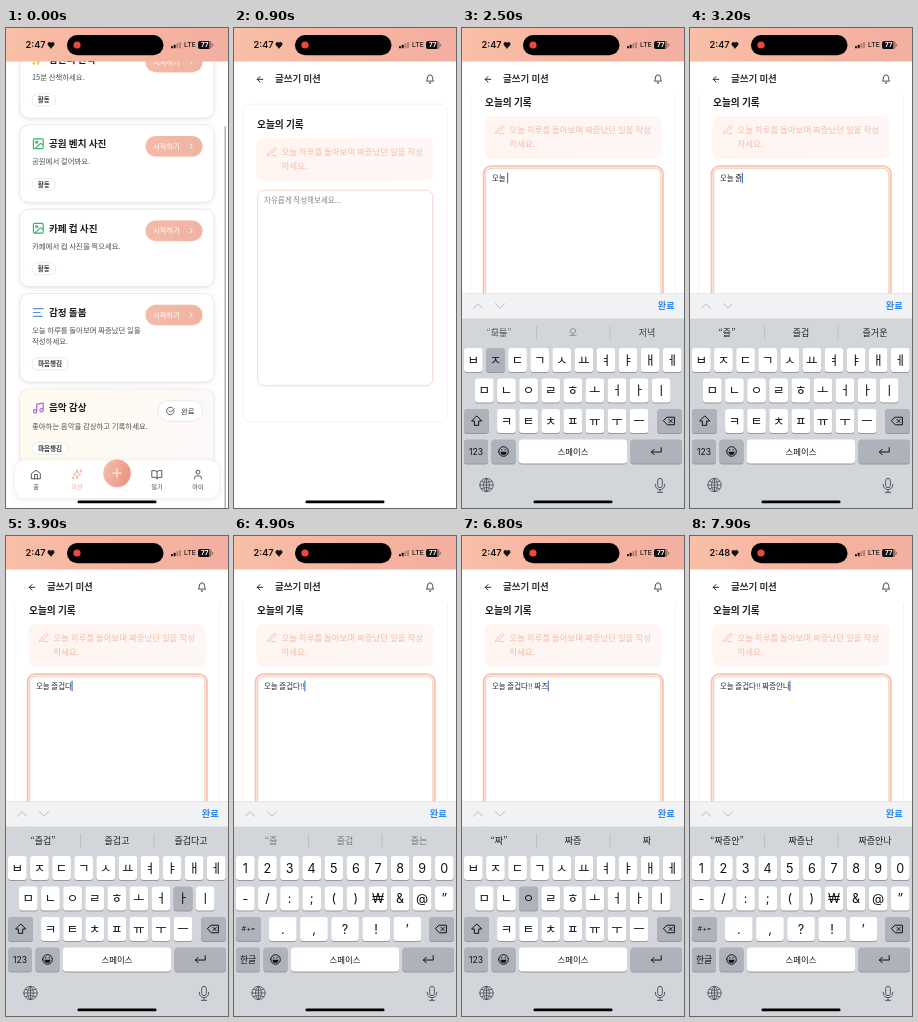
An HTML page with a canvas that plays this animation: 222x480 px, repeating every 8000 ms.

```html
<!DOCTYPE html>
<html lang="ko">
<head>
<meta charset="utf-8">
<title>Writing mission</title>
<style>
html, body { margin: 0; width: 100%; height: 100%; overflow: hidden; background: #fff; }
canvas { display: block; width: 222px; height: 480px; }
</style>
</head>
<body>
<canvas id="stage"></canvas>
<script>
const W = 222, H = 480, LOOP = 8000;
const canvas = document.getElementById('stage');
const ctx = canvas.getContext('2d');
const ratio = window.devicePixelRatio || 1;
canvas.width = W * ratio;
canvas.height = H * ratio;

const KR = '"Noto Sans CJK KR", "Noto Sans CJK", sans-serif';
const LATIN = 'Inter, sans-serif';
const PEACH = '#f5bda9', INK = '#25262b', SPECIAL = '#aeb2ba';

// Outline icons on a 24 unit grid
const ICONS = {
  home: 'M3 10l9-7 9 7v11H3zM9 21v-9h6v9',
  image: 'M5 3h14a2 2 0 0 1 2 2v14a2 2 0 0 1-2 2H5a2 2 0 0 1-2-2V5a2 2 0 0 1 2-2zM7 9a2 2 0 1 0 4 0a2 2 0 1 0-4 0M21 15l-3-3a2 2 0 0 0-3 0L6 21',
  lines: 'M3 5h18M3 12h12M3 19h16',
  music: 'M9 18V5l12-2v13M3 18a3 3 0 1 0 6 0a3 3 0 1 0-6 0M15 16a3 3 0 1 0 6 0a3 3 0 1 0-6 0',
  check: 'M21.5 10a10 10 0 1 1-5-7M8 11l4 4 10-10',
  book: 'M12 7v14M2 4h6a4 4 0 0 1 4 3a4 4 0 0 1 4-3h6v14h-7a3 3 0 0 0-3 3a3 3 0 0 0-3-3H2z',
  user: 'M19 21v-2a4 4 0 0 0-4-4H9a4 4 0 0 0-4 4v2M8 7a4 4 0 1 0 8 0a4 4 0 1 0-8 0',
  spark: 'M12 3l-2 6-6 3 6 2 2 7 2-7 6-2-6-3zM20 2v5M17.5 4.5h5M4 17v4M2 19h4',
  pen: 'M12 20h9M16.5 3.5a2 2 0 0 1 4 3L7 19l-4 1 1-4z',
  bell: 'M6 8a6 6 0 0 1 12 0c0 7 3 9 3 9H3s3-2 3-9M10 21a2 2 0 0 0 4 0',
  back: 'M12 19l-7-7 7-7M19 12H5',
  right: 'M9 5l7 7-7 7',
  up: 'M2 17l10-10 10 10',
  down: 'M2 7l10 10 10-10',
  shift: 'M12 3L3 12h5v8h8v-8h5z',
  erase: 'M9 5h13v14H9L2 12zM12 9l6 6M18 9l-6 6',
  enter: 'M21 5v8H3M8 8l-5 5 5 5',
  globe: 'M2 12a10 10 0 1 0 20 0a10 10 0 1 0-20 0M2 12h20M12 2v20M12 2c-6 5-6 15 0 20c6-5 6-15 0-20M4 6.5q8 4 16 0M4 17.5q8-4 16 0',
  mic: 'M12 2a3.5 3.5 0 0 1 3.5 3.5v7a3.5 3.5 0 0 1-7 0v-7a3.5 3.5 0 0 1 3.5-3.5M5 11v1a7 7 0 0 0 14 0v-1M12 19v4M8 23h8',
  face: 'M2 12a10 10 0 1 0 20 0a10 10 0 1 0-20 0M8.5 7.5v1.500M15.500 7.5v1.500',
  mouth: 'M6 13a6 6 0 0 0 12 0z',
  heart: 'M12 21C5 15 2 12 2 8a5.5 5.5 0 0 1 10-3a5.5 5.5 0 0 1 10 3c0 4-3 7-10 13z'
};
for (const name in ICONS) ICONS[name] = new Path2D(ICONS[name]);

function icon(name, cx, cy, size, color, weight = 0.9, fill) {
  const k = size / 24;
  ctx.save();
  ctx.translate(cx - size / 2, cy - size / 2);
  ctx.scale(k, k);
  ctx.lineWidth = weight / k;
  ctx.lineCap = ctx.lineJoin = 'round';
  ctx.strokeStyle = color;
  if (fill) {
    ctx.fillStyle = fill;
    ctx.fill(ICONS[name]);
  }
  ctx.stroke(ICONS[name]);
  ctx.restore();
}

function rect(x, y, w, h, color) {
  ctx.fillStyle = color;
  ctx.fillRect(x, y, w, h);
}

function box(x, y, w, h, r, fill, line, weight = 0.6) {
  ctx.beginPath();
  ctx.roundRect(x, y, w, h, r);
  if (fill) {
    ctx.fillStyle = fill;
    ctx.fill();
  }
  if (line) {
    ctx.strokeStyle = line;
    ctx.lineWidth = weight;
    ctx.stroke();
  }
}

function withShadow(color, blur, dy, draw) {
  ctx.save();
  ctx.shadowColor = color;
  ctx.shadowBlur = blur * ratio;
  ctx.shadowOffsetY = dy * ratio;
  draw();
  ctx.restore();
}

// y is the middle of the line
function text(s, x, y, size, color = INK, weight = 400, align = 'left', family = KR) {
  ctx.font = `${weight} ${size}px ${family}`;
  ctx.textAlign = align;
  ctx.fillStyle = color;
  ctx.fillText(s, x, y + size * 0.36);
  return ctx.measureText(s).width;
}

function blend(x0, y0, x1, y1, ...colors) {
  const g = ctx.createLinearGradient(x0, y0, x1, y1);
  colors.forEach((c, i) => g.addColorStop(i / (colors.length - 1), c));
  return g;
}

const clamp = v => Math.max(0, Math.min(1, v));
const easeOut = v => 1 - (1 - clamp(v)) ** 3;

function statusBar(t) {
  rect(0, 0, W, 33.5, blend(0, 0, W, 33, '#f9bfa7', '#f6b4a0', '#f3afa1'));
  text(t < 7200 ? '2:47' : '2:48', 19.5, 17, 9.2, '#111', 600, 'left', LATIN);
  icon('heart', 45, 17.2, 7.8, '#111', 0.4, '#111');
  box(61, 7, 96.5, 20.3, 10.1, '#000');
  ctx.beginPath();
  ctx.arc(71, 17, 3.6, 0, 7);
  ctx.fillStyle = '#f0463c';
  ctx.fill();
  for (let i = 0; i < 4; i++) {
    const h = 2.2 + i * 1.4;
    box(165 + i * 2.7, 20.3 - h, 1.9, h, 0.5, i < 2 ? '#111' : 'rgba(60,30,25,.35)');
  }
  text('LTE', 178, 17, 6.8, '#111', 500, 'left', LATIN);
  box(192, 13, 13.6, 8, 2.3, 'rgba(50,30,25,.45)');
  box(192, 13, 11, 8, [2.3, 0, 0, 2.3], '#111');
  box(206.2, 15.7, 1, 2.8, 0.5, 'rgba(50,30,25,.45)');
  text('77', 198.7, 17, 6.4, '#fff', 700, 'center', LATIN);
}

function homeBar() {
  box(71.5, 472.6, 79, 2.7, 1.3, '#000');
}

const CARDS = [
  { y: 12.5, h: 77.5, icon: 'spark', color: '#f0c23c', title: '잠깐의 산책', body: ['15분 산책하세요.'], tag: '활동' },
  { y: 96.8, h: 77.5, icon: 'image', color: '#35b56a', title: '공원 벤치 사진', body: ['공원에서 걸어봐요.'], tag: '활동' },
  { y: 181.2, h: 77.5, icon: 'image', color: '#35b56a', title: '카페 컵 사진', body: ['카페에서 컵 사진을 찍으세요.'], tag: '활동' },
  { y: 265.5, h: 88.5, icon: 'lines', color: '#5b93d6', title: '감정 돌봄', body: ['오늘 하루를 돌아보며 짜증났던 일을', '작성하세요.'], tag: '마음챙김' },
  { y: 361, h: 77.5, icon: 'music', color: '#a56be0', title: '음악 감상', body: ['좋아하는 음악을 감상하고 기록하세요.'], tag: '마음챙김', done: true }
];

function card(c) {
  const { y, h } = c;
  const fill = c.done ? blend(14, y, 208, y + h, '#fffbee', '#fefaf3', '#fdf8fa') : '#fff';
  withShadow('rgba(150,140,200,.24)', 4, 1.2, () => box(14, y, 194, h, 9, fill));
  box(14, y, 194, h, 9, null, c.done ? '#f0e8dc' : '#e0e4e8', 0.7);
  icon(c.icon, 32.3, y + 19, 13, c.color, 1.2);
  text(c.title, 43, y + 19, 9.6, '#1c1d22', 700);
  if (c.done) {
    box(152, y + 11.7, 44.5, 20.5, 10.2, '#fff', '#dcdcde');
    icon('check', 164.5, y + 22, 9, '#4b4e55');
    text('완료', 175, y + 22, 7.3, '#33353b');
  } else {
    const top = y + 11.2;
    withShadow('rgba(240,160,140,.2)', 2, 0.6, () =>
      box(139.5, top, 57, 20.5, 10.2, blend(140, top, 197, top, '#f4baa8', '#f0b3a1')));
    text('시작하기', 147, top + 10.3, 7.3, '#fff');
    icon('right', 185, top + 10.3, 8, '#fff');
  }
  c.body.forEach((s, i) => text(s, 26, y + 37 + i * 11.3, 7.4, '#4c4f58'));
  const top = y + h - 24, w = c.tag.length * 6.3 + 11;
  box(26, top, w, 12, 6, '#fff', '#dadce0');
  text(c.tag, 26 + w / 2, top + 6, 6.5, '#33353b', 700, 'center');
}

function listPage(t) {
  rect(0, 0, W, H, '#fff');
  CARDS.forEach(card);
  ctx.globalAlpha = 1 - clamp((t - 300) / 250);
  box(218.5, 98, 1.5, H, 0.7, '#b0b1b4');
  ctx.globalAlpha = 1;
  withShadow('rgba(130,115,150,.2)', 6, 1, () => box(9, 432.5, 204, 37.5, 9, '#fff'));
  [['home', '홈', 30], ['spark', '미션', 71], ['book', '일기', 151], ['user', '마이', 192]].forEach(([name, label, x]) => {
    const color = name === 'spark' ? '#f0ac98' : '#45484f';
    icon(name, x, 446.5, 11.5, color);
    text(label, x, 458.7, 6.2, color, 400, 'center');
  });
  withShadow('rgba(230,130,110,.2)', 2, 0.5, () =>
    box(97.3, 431.5, 27.4, 27.4, 13.7, blend(98, 440, 124, 450, '#f5bba8', '#e89580')));
  rect(106.5, 444.6, 9, 1, '#fff');
  rect(110.5, 440.6, 1, 9, '#fff');
  homeBar();
}

function writePage(t, typed, lift) {
  const focused = t >= 1100;
  rect(0, 0, W, H, '#fff');
  ctx.save();
  ctx.translate(0, (1 - lift) * 22);
  box(8.5, 54, 205, 318, 9, '#fff', '#fcf1ed', 1);
  text('오늘의 기록', 23, 75, 9.7, '#1c1d22', 700);
  box(22.5, 88, 177.5, 43, 7, blend(22, 88, 200, 131, '#fff5f1', '#fdf7f6'));
  icon('pen', 37.7, 102, 11, PEACH);
  text('오늘 하루를 돌아보며 짜증났던 일을 작성', 47.5, 101.5, 8.45, PEACH);
  text('하세요.', 47.5, 115.7, 8.45, PEACH);
  if (focused) box(21.5, 138, 179.5, 200, 8, '#fdf1ec', '#f5c0ad', 1.6);
  box(23.7, 140.2, 175.1, 195.6, 6.5, '#fff', focused ? '#f5c4b3' : '#f3d3c9', 0.9);
  let end = 30;
  if (typed) end += text(typed, 30, 150, 7.45, '#24252a');
  else text('자유롭게 작성해보세요...', 30, 150, 7.5, '#85878e');
  if (focused) rect(end - 0.4, 144.7, 1.2, 10.6, '#4378dc');
  ctx.restore();
  rect(0, 33, W, 34, '#fff');
  icon('back', 26, 51.3, 9.5, '#2a2b30', 1);
  text('글쓰기 미션', 41, 51, 9.5, '#33343a', 700);
  icon('bell', 196, 51, 10, '#3b3d44');
}

// Time, pressed key, resulting text
const BASE = '오늘 즐겁다';
const STROKES = [
  [1760, 'ㅇ', 'ㅇ'], [1880, 'ㅗ', '오'], [2000, 'ㄴ', '온'], [2120, 'ㅡ', '오느'], [2240, 'ㄹ', '오늘'],
  [2350, 'space', '오늘 '], [2470, 'ㅈ', '오늘 ㅈ'], [2660, 'ㅡ', '오늘 즈'], [2840, 'ㄹ', '오늘 즐'],
  [3040, 'ㄱ', '오늘 즑'], [3240, 'ㅓ', '오늘 즐거'], [3440, 'ㅂ', '오늘 즐겁'], [3630, 'ㄷ', '오늘 즐겁ㄷ'],
  [3800, 'ㅏ', BASE], [4160, 'mode', BASE], [4430, '!', BASE + '!'], [4640, '!', BASE + '!!'],
  [5160, 'space', BASE + '!! '], [5760, 'shift', BASE + '!! '], [5960, 'ㅉ', BASE + '!! ㅉ'],
  [6160, 'ㅏ', BASE + '!! 짜'], [6360, 'ㅈ', BASE + '!! 짲'], [6560, 'ㅡ', BASE + '!! 짜즈'],
  [6760, 'ㅇ', BASE + '!! 짜증'], [6920, 'ㅇ', BASE + '!! 짜증ㅇ'], [7060, 'ㅏ', BASE + '!! 짜증아'],
  [7200, 'ㄴ', BASE + '!! 짜증안'], [7340, 'ㄴ', BASE + '!! 짜증안ㄴ'], [7480, 'ㅏ', BASE + '!! 짜증안나'],
  [7660, 'mode', BASE + '!! 짜증안나']
];

const HINTS = [
  [0, '나', '아', '나는'], [1960, '“오”', '오늘', '오늘은'], [2200, '“오늘”', '오', '저녁'],
  [2400, '하루', '', '저녁'], [2660, '“즈”', '즐', '즉'], [2940, '“즐”', '즐겁', '즐거운'],
  [3540, '“즐겁”', '즐겁고', '즐겁다고'], [4200, '“즐', '즐겁', '즐는'], [4800, '', '', ''],
  [6260, '“짜”', '짜증', '짜'], [6960, '“짜증”', '짜증나', '짜증이'], [7360, '“짜증안”', '짜증난', '짜증안나']
];

function hints(t) {
  const i = HINTS.findLastIndex(h => h[0] <= t);
  const mix = i ? clamp((t - HINTS[i][0]) / 200) : 1;
  const row = (set, alpha) => {
    ctx.globalAlpha = alpha;
    for (let k = 1; k < 4; k++) text(set[k], 37 + (k - 1) * 74, 305, 9, '#1d1e22', 400, 'center');
    ctx.globalAlpha = 1;
  };
  if (mix < 1) row(HINTS[i - 1], 1 - mix);
  row(HINTS[i], mix);
}

const PITCH = 22.1, KEY_W = 18.7, KEY_H = 24, ROW_Y = [320, 350.5, 381, 411.5];

function key(x, y, w, fill) {
  box(x, y + 0.9, w, KEY_H, 3, '#96999f');
  box(x, y, w, KEY_H, 3, fill);
}

function keyRow(chars, x, row, pressed, size, family, pitch = PITCH, w = KEY_W) {
  [...chars].forEach((c, i) => {
    const left = x + i * pitch, y = ROW_Y[row];
    key(left, y, w, c === pressed ? SPECIAL : '#fff');
    text(c, left + w / 2, y + 12, size, '#111', 400, 'center', family);
  });
}

function keyboard(t, pressed) {
  const numeric = (t >= 4220 && t < 5260) || t >= 7720;
  const shifted = t >= 5800 && t < 6080;
  rect(0, 265.5, W, 25, '#f1f2f4');
  rect(0, 265.2, W, 0.6, '#dcdde1');
  rect(0, 290.5, W, 240, '#d2d5da');
  icon('up', 16, 278, 11, '#b9bbc0', 1);
  icon('down', 38, 278, 11, '#b9bbc0', 1);
  text('완료', 204.3, 278, 9.2, '#2b88f3', 700, 'center');
  rect(74, 298, 0.7, 14, '#b3b6be');
  rect(147.7, 298, 0.7, 14, '#b3b6be');
  hints(t);

  if (numeric) {
    keyRow('1234567890', 2, 0, pressed, 12.6, LATIN);
    keyRow('-/:;()₩&@”', 2, 1, pressed, 12.6, LATIN);
    keyRow('.,?!’', 35, 2, pressed, 12.6, LATIN, 31.1, 27.7);
  } else {
    keyRow(shifted ? 'ㅃㅉㄸㄲㅆㅛㅕㅑㅒㅖ' : 'ㅂㅈㄷㄱㅅㅛㅕㅑㅐㅔ', 2, 0, pressed, 12.5, KR);
    keyRow('ㅁㄴㅇㄹㅎㅗㅓㅏㅣ', 13, 1, pressed, 12.5, KR);
    keyRow('ㅋㅌㅊㅍㅠㅜㅡ', 35.1, 2, pressed, 12.5, KR);
  }

  const [, , y3, y4] = ROW_Y;
  key(2, y3, 25, shifted ? '#fff' : SPECIAL);
  if (numeric) text('#+=', 14.5, y3 + 12, 6.8, '#111', 400, 'center', LATIN);
  else icon('shift', 14.5, y3 + 12, 13, '#111', 1, shifted && '#111');
  key(195, y3, 25, SPECIAL);
  icon('erase', 207, y3 + 12, 13, '#111', 1);
  key(2, y4, 24, SPECIAL);
  if (numeric) text('한글', 14, y4 + 12, 8.8, '#111', 400, 'center');
  else text('123', 14, y4 + 12, 8.6, '#111', 400, 'center', LATIN);
  key(29.5, y4, 24, SPECIAL);
  icon('face', 41.5, y4 + 12, 11.5, '#111', 1);
  icon('mouth', 41.5, y4 + 12, 11.5, '#111', 0.3, '#111');
  key(57, y4, 108, pressed === 'space' ? SPECIAL : '#fff');
  text('스페이스', 111, y4 + 12, 8.4, '#111', 400, 'center');
  key(168.5, y4, 51.5, SPECIAL);
  icon('enter', 194.3, y4 + 12, 13, '#111', 1);
  icon('globe', 24.5, 457, 16, '#53575f', 0.9);
  icon('mic', 198, 457, 16, '#53575f', 1);
}

function draw(t) {
  ctx.setTransform(ratio, 0, 0, ratio, 0, 0);
  if (t < 600) {
    listPage(t);
  } else {
    const typed = STROKES.findLast(s => s[0] + 70 <= t);
    const hit = STROKES.findLast(s => s[0] <= t && t < s[0] + 140);
    const lift = easeOut((t - 1100) / 380);
    writePage(t, typed ? typed[2] : '', lift);
    if (lift > 0) {
      ctx.save();
      ctx.translate(0, (1 - lift) * 215);
      keyboard(t, hit && hit[1]);
      ctx.restore();
    }
    homeBar();
  }
  statusBar(t);
}

const start = performance.now();
function tick() {
  draw((performance.now() - start) % LOOP);
  requestAnimationFrame(tick);
}
tick();
</script>
</body>
</html>
```
